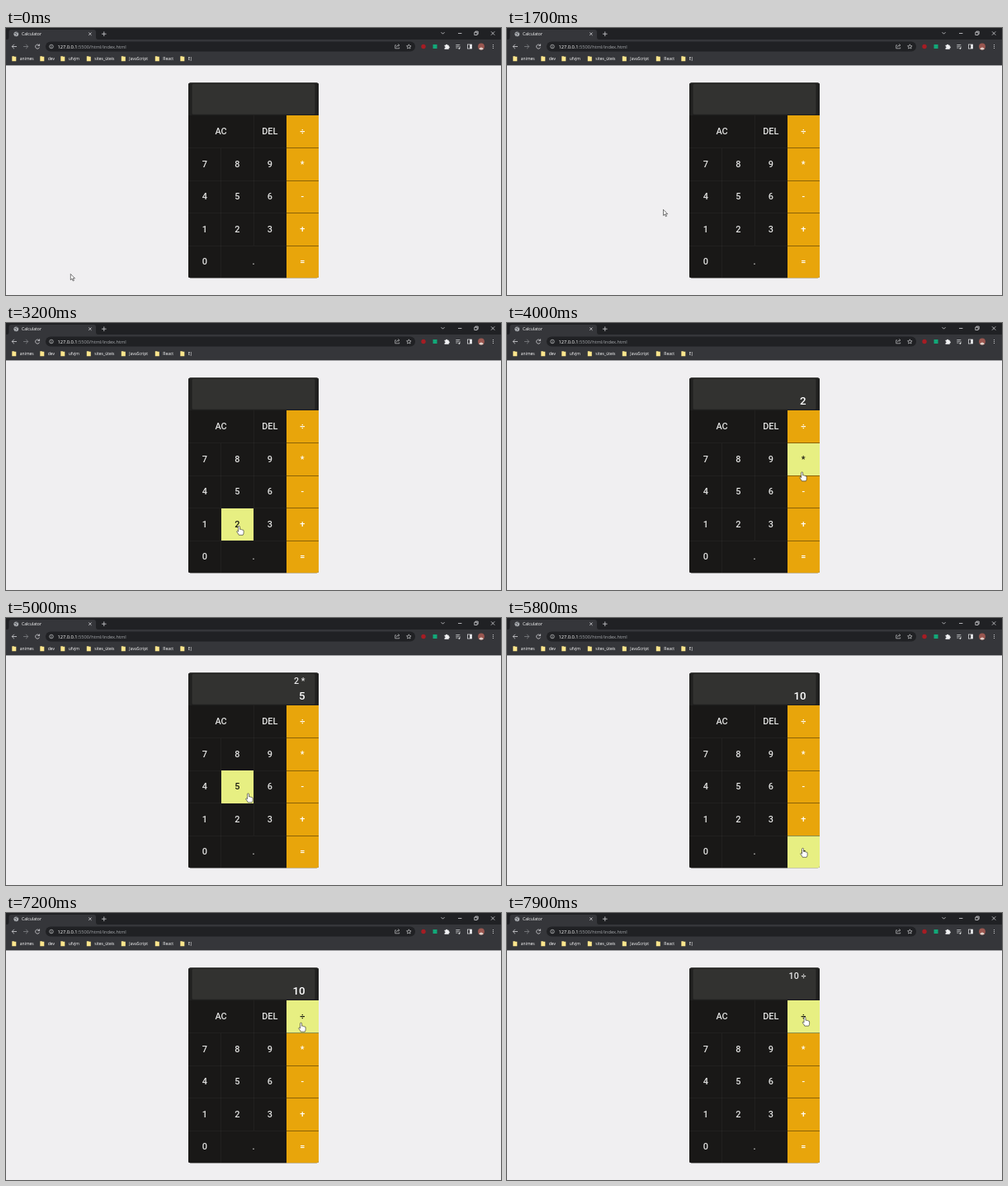
An HTML page that plays this animation: 600 by 324 pixels, repeating every 8 s.

```html
<!DOCTYPE html>
<html lang="en">
<head>
<meta charset="utf-8">
<title>Calculator</title>
<style>
html, body { margin: 0; width: 100%; height: 100%; overflow: hidden; background: #f0eff1; }
svg { display: block; width: 600px; height: 324px; }
.ui { font-family: "Open Sans", sans-serif; font-size: 5px; fill: #fff; }
.calc { font-family: Roboto, sans-serif; font-weight: 500; }
.line { fill: none; stroke: #dcdde0; stroke-width: .75; }
.crisp { shape-rendering: crispEdges; }
</style>
</head>
<body>
<svg id="stage" viewBox="0 0 600 324" xmlns="http://www.w3.org/2000/svg">
  <defs>
    <clipPath id="body"><rect x="221" y="66.500" width="158" height="236.800" rx="2.500"/></clipPath>
  </defs>
  <rect width="600" height="324" fill="#f0eff1"/>
  <g id="browser" class="ui">
    <rect width="600" height="45.400" fill="#35363a"/>
    <rect width="600" height="14" fill="#202124"/>
    <path d="M1 14Q3.500 14 3.500 11V5Q3.500 2 6.500 2H106Q109 2 109 5V11Q109 14 111.500 14Z" fill="#35363a"/>
    <circle cx="12.300" cy="7.300" r="2.900" fill="#a9acb0"/>
    <path d="M10.200 6.200l2 .5.500 1.500-1 1.200M12.300 4.800l1 1 1.300-.2" fill="none" stroke="#404248" stroke-width=".7"/>
    <text x="19" y="9.100" font-size="5.100">Calculator</text>
    <path class="line" d="M100.200 5.500l3.400 3.400m0-3.400l-3.400 3.400M116 7.200h5.600M118.800 4.400v5.600"/>
    <path class="line" d="M527.500 5.200l2 2 2-2M548 6.500h4.400M588 4.300l4.300 4.300m0-4.300l-4.300 4.300"/>
    <path class="line" d="M567.800 5.200h3.300v3.300h-3.300zM568.900 5v-.9h3.300v3.300h-.9"/>

    <path class="line" d="M13 22.500H7.300m2.600-2.700l-2.700 2.700 2.700 2.700"/>
    <path class="line" d="M21 22.500h5.700m-2.600-2.700l2.700 2.700-2.700 2.700" style="stroke:#84868a"/>
    <path class="line" d="M40.300 21.300A2.500 2.500 0 1 0 40.500 23.500M40.600 19.400v2.200h-2.200"/>
    <rect x="48" y="16.500" width="448" height="12" rx="6" fill="#202124"/>
    <circle class="line" cx="55" cy="22.500" r="2.300" style="stroke-width:.6"/>
    <path class="line" d="M55 22.200v1.600M55 21.100v.5" style="stroke-width:.6"/>
    <text x="62.500" y="24.600" font-size="5.700" fill="#a4a7ab"><tspan fill="#fff">127.0.0.1</tspan>:5500/html/index.html</text>
    <path class="line" d="M473 20.800h-1.300v4h5V23.500M473.200 23.300q.2-2.300 3.300-2.400m-1.200-1.400l1.500 1.400-1.500 1.400" style="stroke-width:.6"/>
    <path id="star" class="line" style="stroke-width:.6"/>
    <circle cx="506" cy="22.500" r="2.700" fill="#a51d24"/>
    <rect x="517.500" y="20" width="5" height="5" fill="#12a878"/>
    <path d="M531.500 20.800h1.500a1.100 1.100 0 0 1 2.200 0h1.500v1.500a1.100 1.100 0 0 1 0 2.200v1.200h-5.200v-1.500a1 1 0 0 0 0-2z" fill="#f0f1f3"/>
    <path class="line" d="M545.300 20.500h5M545.300 22.300h3.700M545.300 24.100h2.200M550 22v3" style="stroke-width:.7"/>
    <circle cx="549.300" cy="24.800" r=".9" fill="#f0f1f3"/>
    <rect class="line" x="559.500" y="20" width="5" height="5"/>
    <rect x="562.200" y="20" width="2.300" height="5" fill="#f0f1f3"/>
    <circle cx="576" cy="22.500" r="3.900" fill="#9a5750"/>
    <path d="M573.200 25.200q2.800-3.200 5.600 0a3.900 3.900 0 0 1-5.600 0" fill="#e2d3cc"/>
    <g fill="#dcdde0"><circle cx="590.500" cy="20.500" r=".6"/><circle cx="590.500" cy="22.500" r=".6"/><circle cx="590.500" cy="24.500" r=".6"/></g>
  </g>
  <g class="calc" text-anchor="middle">
    <g clip-path="url(#body)">
      <rect x="221" y="66" width="158" height="238" fill="#191817"/>
      <rect x="221" y="66" width="158" height="40" fill="#20201f"/>
      <rect x="225.500" y="68" width="149" height="36.800" rx="1.500" fill="#323230"/>
      <g id="boxes" class="crisp"></g>
      <g id="seams" class="crisp"></g>
    </g>
    <g id="labels"></g>
  </g>
  <g class="calc" text-anchor="end" fill="#fff">
    <text id="prev" x="362.500" y="79.800" font-size="10.700" fill="#e6e6e6"></text>
    <text id="now" x="362.500" y="99" font-size="13.300"></text>
  </g>
  <g id="cursor" stroke-linejoin="round">
    <path id="arrow" d="M0 0V7.200L1.700 5.700 2.900 8.400 4.100 7.900 2.900 5.300H5.200Z" fill="#fff" stroke="#222" stroke-width=".6"/>
    <path id="hand" d="M-1 .9Q-1-.1 0-.1T1 .9V4Q2 3.400 2.700 4.200 3.700 3.800 4.200 4.700 5.600 4.400 5.600 5.800V8Q5.600 9.400 4.700 10.800H-.2Q-.8 9.300-2.700 7Q-3.100 6.200-2.300 5.900-1.700 5.800-1 6.700Z" fill="#fff" stroke="#222" stroke-width=".6"/>
  </g>
</svg>
<script>
const NS = "http://www.w3.org/2000/svg";
const $ = id => document.getElementById(id);
const LOOP = 8000, STEP = 100;

function add(parent, tag, attrs, label = "") {
  const el = document.createElementNS(NS, tag);
  for (const k in attrs) el.setAttribute(k, attrs[k]);
  el.textContent = label;
  parent.appendChild(el);
  return el;
}

// Five-pointed bookmark star
$("star").setAttribute("d", "M" + Array.from({ length: 10 }, (_, i) => {
  const a = i * Math.PI / 5 - Math.PI / 2, r = i % 2 ? 1.3 : 2.9;
  return (488.3 + r * Math.cos(a)).toFixed(2) + " " + (22.7 + r * Math.sin(a)).toFixed(2);
}).join("L") + "Z");

const folders = [["animes", 7], ["dev", 41], ["ufvjm", 66], ["sites_úteis", 97.5],
  ["JavaScript", 139.5], ["React", 180.5], ["EJ", 211]];
for (const [name, x] of folders) {
  add($("browser"), "path", { d: `M${x + .3} 34.200h2.300l.7.600h2v5.400h-5z`, fill: "#fbe58c" });
  add($("browser"), "text", { x: x + 9.8, y: 38.8 }, name);
}

const rows = [["AC", "", "DEL", "÷"], ["7", "8", "9", "*"], ["4", "5", "6", "-"],
  ["1", "2", "3", "+"], ["0", ".", "", "="]];
const CELL = 39.5, LEFT = 221, TOP = 106;
const keys = [];
rows.forEach((row, r) => row.forEach((label, c) => {
  if (!label) return;
  const w = (label === "AC" || label === "." ? 2 : 1) * CELL;
  const x = LEFT + c * CELL, y = TOP + r * CELL, op = c === 3;
  const base = op ? "#e8a50b" : "#191817";
  const ink = op ? "#fff" : "#e4e4e3";
  const box = add($("boxes"), "rect", { x, y, width: w, height: CELL, fill: base });
  const text = add($("labels"), "text", { x: x + w / 2, y: y + CELL / 2 + 3.4,
    "font-size": 10.9, fill: ink }, label);
  const seam = { fill: op ? "#0006" : "#ffffff09" };
  if (r) add($("seams"), "rect", { x, y: Math.floor(y), width: w, height: 1, ...seam });
  if (c && !op) add($("seams"), "rect", { x: Math.floor(x), y, width: 1, height: CELL, ...seam });
  keys.push({ x, y, w, base, ink, box, text });
}));

// Pointer stops: time, x, y
const path = [[0, 78.3, 298.5], [1000, 78.3, 298.5], [1700, 189.5, 220.3],
  [2500, 282.5, 246.5], [3500, 282.5, 246.5], [3900, 357.6, 181], [4300, 357.6, 181],
  [4800, 293.5, 213], [5000, 293.5, 213], [5400, 358.5, 279.5], [6300, 358.5, 279.5],
  [6600, 299, 252.3], [7300, 361, 126.3], [LOOP, 361, 126.3]];

// Display contents: time, upper line, lower line
const shows = [[0, "", ""], [3400, "", "2"], [4200, "2 *", ""], [4900, "2 *", "5"],
  [5800, "", "10"], [7700, "10 ÷", ""]];

function pointer(t) {
  const i = path.findIndex(p => p[0] > t);
  const [t0, x0, y0] = path[i - 1], [t1, x1, y1] = path[i];
  const u = (t - t0) / (t1 - t0), e = u * u * (3 - 2 * u);
  return [x0 + (x1 - x0) * e, y0 + (y1 - y0) * e];
}

function draw(t) {
  const [x, y] = pointer(t);
  let over = false;
  for (const k of keys) {
    const hit = x >= k.x && x < k.x + k.w && y >= k.y && y < k.y + CELL;
    over = over || hit;
    k.box.setAttribute("fill", hit ? "#e7ef82" : k.base);
    k.text.setAttribute("fill", hit ? "#171710" : k.ink);
  }
  $("cursor").setAttribute("transform", `translate(${x} ${y})`);
  $("hand").style.display = over ? "" : "none";
  $("arrow").style.display = over ? "none" : "";
  const show = shows.filter(s => s[0] <= t).pop();
  $("prev").textContent = show[1];
  $("now").textContent = show[2];
}

const start = performance.now();
function tick() {
  const t = (performance.now() - start) % LOOP;
  draw(Math.floor(t / STEP) * STEP);
  requestAnimationFrame(tick);
}
tick();
</script>
</body>
</html>
```
